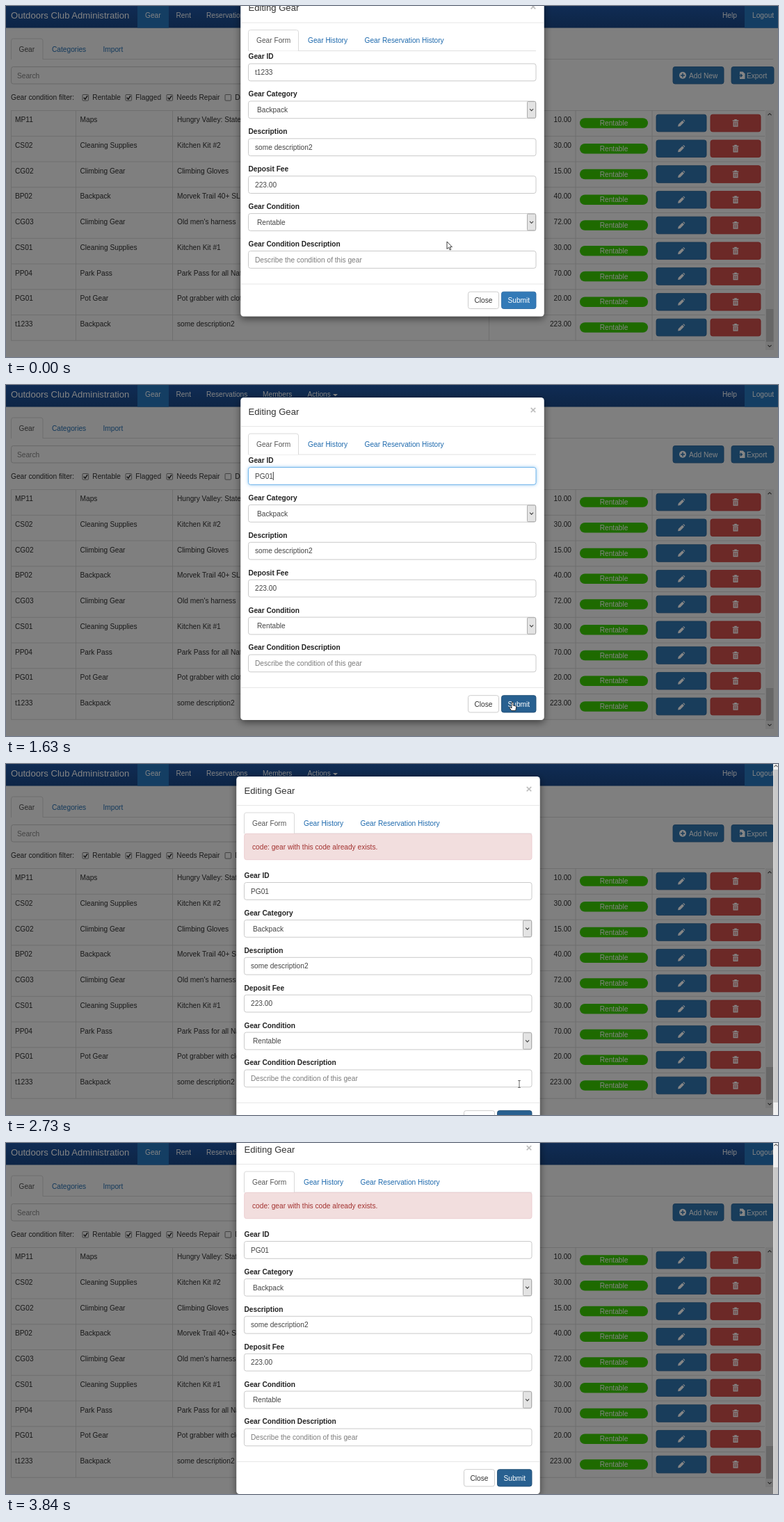
These frames come from a looping animation (1110 px wide and 505 px high, 4460 ms). An HTML page:

```html
<!DOCTYPE html>
<html lang="en">
<head>
<meta charset="utf-8">
<title>Gear administration</title>
<style>
html, body { margin: 0; width: 100%; height: 100%; overflow: hidden; background: #7f7f7f; }
svg { display: block; font-family: "Liberation Sans", Arial, sans-serif; }
text { white-space: pre; }
</style>
</head>
<body>
<svg width="1110" height="505" viewBox="0 0 1110 505">
  <defs>
    <linearGradient id="nav" x2="0" y2="1">
      <stop stop-color="#102c54"/><stop offset="1" stop-color="#0d2546"/>
    </linearGradient>
    <filter id="shadow" x="-10%" y="-10%" width="120%" height="120%">
      <feDropShadow dx="0" dy="3.6" stdDeviation="5.4" flood-opacity=".5"/>
    </filter>
    <filter id="glow" x="-5%" y="-50%" width="110%" height="200%">
      <feDropShadow dx="0" dy="0" stdDeviation="2.4" flood-color="#66afe9" flood-opacity=".7"/>
    </filter>
  </defs>
  <g id="page"></g>
  <g id="dialog"></g>
  <g id="pointer"></g>
</svg>
<script>
const LOOP = 4460, BODY = 10.18, HEADING = 13.1;
const layer = id => document.getElementById(id);

// y is the vertical middle of the capitals
const text = (x, y, str, fill = '#222', { size = BODY, anchor = 'start', weight = 'normal' } = {}) =>
  `<text x="${x}" y="${y + size * 0.36}" font-size="${size}" fill="${fill}" text-anchor="${anchor}" font-weight="${weight}">${str}</text>`;
const rect = (x, y, w, h, fill, stroke = 'none', r = 0, extra = '') =>
  `<rect x="${x}" y="${y}" width="${w}" height="${h}" rx="${r}" fill="${fill}" stroke="${stroke}" stroke-width=".9" ${extra}/>`;
const path = (d, fill, stroke = 'none', width = 1) =>
  `<path d="${d}" fill="${fill}" stroke="${stroke}" stroke-width="${width}"/>`;
const line = (d, stroke, width = 0.9) => path(d, 'none', stroke, width);
const at = (x, y, content) => `<g transform="translate(${x} ${y})">${content}</g>`;
const chevron = (x, y, dir, color) => line(`M${x - 2.5} ${y - 1.2 * dir}l2.5 ${2.5 * dir}l2.5 ${-2.5 * dir}`, color, 1.1);
const tab = (x, y, w, fill, stroke) =>
  path(`M${x} ${y + 30}V${y + 3}q0 -3 3 -3H${x + w - 3}q3 0 3 3V${y + 30}`, fill, stroke, 0.9);

// Page colours as seen through the half-black backdrop
const GREY = '#7f7f7f', RULE = '#6e6e6e', INK = '#191919', LINK = '#143a5c', ACTIVE = '#143e63',
  BLUE = '#193d5b', BLUE_EDGE = '#173652', RED = '#6c2927', RED_EDGE = '#6a1f1d', GREEN = '#1e6a00', PALE = '#858585';

const pencil = path('M-5 5L-4.2 1.8L1.4 -3.8L4 -1.2L-1.6 4.4Z M2.2 -4.5L3.2 -5.3L5.3 -3.2L4.7 -2Z', PALE);
const trash = path('M-4.3 -4.2H-1.8V-5.4H1.8V-4.2H4.3V-2.8H-4.3Z M-3.5 -2H3.5V5.3H-3.5Z', PALE) +
  line('M-1.7 -1V4M0 -1V4M1.7 -1V4', RED, 0.7);

const rows = [
  ['MP11', 'Maps', 'Hungry Valley: State Park', '10.00'],
  ['CS02', 'Cleaning Supplies', 'Kitchen Kit #2', '30.00'],
  ['CG02', 'Climbing Gear', 'Climbing Gloves', '15.00'],
  ['BP02', 'Backpack', 'Morvek Trail 40+ SL', '40.00'],
  ['CG03', 'Climbing Gear', 'Old men\'s harness', '72.00'],
  ['CS01', 'Cleaning Supplies', 'Kitchen Kit #1', '30.00'],
  ['PP04', 'Park Pass', 'Park Pass for all National Parks', '70.00'],
  ['PG01', 'Pot Gear', 'Pot grabber with cloth', '20.00'],
  ['t1233', 'Backpack', 'some description2', '223.00']
];

function drawNav() {
  const items = [[200, 'Gear'], [244.5, 'Rent'], [288, 'Reservations'], [369, 'Members'],
    [433.5, 'Actions'], [1030, 'Help'], [1073, 'Logout']];
  return rect(0, 0, 1110, 31.5, 'url(#nav)') +
    rect(189, 0, 45, 31.5, ACTIVE) + rect(1062, 0, 48, 31.5, ACTIVE) +
    text(7, 13.7, 'Outdoors Club Administration', PALE, { size: HEADING }) +
    items.map(([x, label]) => text(x, 13.7, label, PALE)).join('') +
    path('M470 13h7l-3.5 3.2Z', PALE);
}

function drawToolbar() {
  const checks = [[110, 'Rentable', 1], [172, 'Flagged', 1], [231, 'Needs Repair', 1], [315, 'Deleted', 0]];
  return line('M7 76.5H1103', RULE) + tab(7.5, 47, 45.5, GREY, RULE) +
    text(18.5, 62, 'Gear', '#2a2a2a') + text(66, 62, 'Categories', LINK) + text(139.5, 62, 'Import', LINK) +
    rect(7.5, 87.5, 692, 24.5, GREY, '#666', 3) + text(16, 100, 'Search', '#444') +
    rect(959, 87.5, 73, 24.5, BLUE, BLUE_EDGE, 3) + text(982, 100, 'Add New', PALE) +
    `<circle cx="973" cy="99.7" r="5" fill="${PALE}"/>` + line('M970 99.7h6M973 96.7v6', BLUE, 1.6) +
    rect(1043, 87.5, 61, 24.5, BLUE, BLUE_EDGE, 3) + text(1065, 100, 'Export', PALE) +
    path('M1055 94.5h4.5l3 3v7.5h-7.5Z', PALE) + line('M1052 100h6M1056 97.7l2.4 2.3l-2.4 2.3', BLUE, 1.3) +
    text(7, 131.5, 'Gear condition filter:', INK) +
    checks.map(([x, label, on]) => rect(x, 127.5, 8.6, 8.6, GREY, '#3a3a3a', 1) +
      (on ? line(`M${x + 1.8} 131.8l2 2.3l3.3 -4.9`, '#111', 1.4) : '') +
      text(x + 14.3, 131.5, label, INK)).join('');
}

function drawRow([id, category, description, fee], i) {
  const y = 150.5 + i * 36.75, mid = y + 18;
  return line(`M7 ${y + 36.75}H1091`, RULE) +
    text(13, y + 13, id, INK) + text(106.5, y + 13, category, INK) + text(246, y + 13, description, INK) +
    text(813, y + 13, fee, INK, { anchor: 'end' }) +
    rect(825, mid - 7.3, 98, 14.6, GREEN, 'none', 7.3) +
    text(874, mid, 'Rentable', PALE, { anchor: 'middle' }) +
    rect(935, mid - 12.3, 72, 24.6, BLUE, BLUE_EDGE, 3) + at(971, mid, pencil) +
    rect(1013, mid - 12.3, 72, 24.6, RED, RED_EDGE, 3) + at(1049, mid, trash);
}

function drawPage() {
  const columns = [7.5, 100.5, 239.5, 694.5, 819, 929].map(x => `M${x} 150.5V481`).join('');
  return rect(0, 0, 1110, 505, GREY) + drawNav() + drawToolbar() +
    line('M7 150.5H1091' + columns, RULE) + rows.map(drawRow).join('') +
    rect(1092, 150, 12, 345, '#787878') + rect(1093, 436, 10.5, 47, '#676767') +
    chevron(1098, 156, -1, '#222') + chevron(1098, 489, 1, '#222');
}

function drawField(label, value, i, s) {
  const y = 118.5 + i * 53.9, mid = y + 12.5;
  const isSelect = i === 1 || i === 4, isEmpty = i === 5, focused = i === 0 && s.focus;
  let out = text(348.5, y - 10.2, label, '#222', { weight: 'bold' }) +
    rect(348.5, y, 413.5, 24.8, '#fff', focused ? '#66afe9' : '#c4c4c4', 3, focused ? 'filter="url(#glow)"' : '');
  if (focused && s.selected) {
    const [from, to] = s.selected;
    out += rect(from, mid - 6.2, to - from, 12.4, '#3390ff');
  }
  out += text(isSelect ? 361 : 358, mid, value, isEmpty ? '#7c7c7c' : focused && s.selected ? '#fff' : '#444');
  if (focused && s.caret) out += rect(s.caret, mid - 6, 0.9, 12, '#222');
  if (isSelect) out += rect(749.5, y + 0.6, 12, 23.6, '#e3e3e3', '#a5a5a5', 1) + chevron(755.6, mid, 1, '#444');
  return out;
}

function drawDialog(s) {
  const shift = s.error ? 52 : 0, link = '#1d69ad';
  const fields = [['Gear ID', s.id], ['Gear Category', 'Backpack'], ['Description', 'some description2'],
    ['Deposit Fee', '223.00'], ['Gear Condition', 'Rentable'],
    ['Gear Condition Description', 'Describe the condition of this gear']];
  const head = rect(337.3, 18, 436.4, 464 + shift, '#fff', 'none', 4.4, 'filter="url(#shadow)"') +
    text(348.5, 38, 'Editing Gear', '#333', { size: HEADING }) +
    text(758, 35.5, '×', '#bdbdbd', { size: 15.3, weight: 'bold', anchor: 'middle' }) +
    line('M338 59.5H773', '#e5e5e5') + line('M348.5 100H762', '#ddd') + tab(348.5, 70, 72, '#fff', '#d5d5d5') +
    text(360, 85, 'Gear Form', '#555') + text(434, 85, 'Gear History', link) +
    text(515.5, 85, 'Gear Reservation History', link);
  const alert = s.error ? rect(348.7, 100.3, 413.3, 37.4, '#f2dede', '#ebccd1', 3) +
    text(360, 119, 'code: gear with this code already exists.', '#a33331') : '';
  const footer = line('M338 435.5H773', '#e5e5e5') +
    rect(664.5, 446.7, 44, 24.3, '#fff', '#c8c8c8', 3) + text(686.4, 459, 'Close', '#333', { anchor: 'middle' }) +
    rect(712.5, 446.7, 49.5, 24.3, s.hover ? '#286090' : '#337ab7', s.hover ? '#204d74' : '#2e6da4', 3) +
    text(737.3, 459, 'Submit', '#fff', { anchor: 'middle' });
  const body = fields.map(([label, value], i) => drawField(label, value, i, s)).join('') + footer;
  const scrollbar = s.error ? rect(1103, 0, 7, 505, '#f1f1f1') +
    rect(1103.5, 8 - s.dy * 0.93, 6.5, 479, '#c9c9c9') + chevron(1107, 3, -1, '#555') : '';
  return at(s.error ? -6 : 0, s.dy, head + alert + at(0, shift, body)) + scrollbar;
}

const pointers = {
  arrow: path('M0 0V10.6L2.5 8.3L4.2 12L5.8 11.3L4.2 7.7H7.4Z', '#fff', '#111', 0.8),
  beam: line('M-1.8 -5H1.8M0 -5V5M-1.8 5H1.8', '#444', 0.8),
  hand: path('M-1 0.8Q0 -0.8 1 0.8V5L5 6Q6 6.4 5.6 8L4.7 12.5H-1.2L-4 8.5Q-4.2 6.8 -2.6 7.4L-1 9Z', '#fff', '#111', 0.8)
};

// Each step changes only the listed properties
const steps = [
  [0, { dy: -35.5, id: 't1233', pointer: ['arrow', 634, 339] }],
  [120, { dy: -2, pointer: ['arrow', 470, 240] }],
  [290, { dy: 0, pointer: ['arrow', 347, 155] }],
  [430, { focus: true, caret: 384, pointer: ['beam', 385, 131] }],
  [550, { caret: 0, selected: [369, 384], pointer: ['beam', 369, 131] }],
  [670, { selected: [358, 384], pointer: ['beam', 350, 131] }],
  [790, { pointer: ['arrow', 290, 127] }],
  [1150, { id: 'P', selected: null, caret: 365 }],
  [1270, { id: 'PG', caret: 372.7 }],
  [1390, { id: 'PG01', caret: 383.8 }],
  [1510, { pointer: ['arrow', 713, 443] }],
  [1630, { pointer: ['hand', 728, 456], hover: true }],
  [1750, { pointer: ['hand', 737.5, 460] }],
  [1870, { caret: 0 }],
  [2240, { caret: 383.8 }],
  [2490, { focus: false }],
  [2610, { error: true }],
  [2730, { pointer: ['beam', 738, 460.5] }],
  [3480, { dy: -2 }],
  [3600, { dy: -11 }],
  [3720, { dy: -23 }],
  [3840, { dy: -29, pointer: null }]
];

let shown = -1;
function render(now) {
  const t = now % LOOP;
  const count = steps.filter(([time]) => time <= t).length;
  if (count !== shown) {
    shown = count;
    const state = Object.assign({}, ...steps.slice(0, count).map(([, change]) => change));
    layer('dialog').innerHTML = drawDialog(state);
    const [kind, x, y] = state.pointer || [];
    layer('pointer').innerHTML = kind ? at(x, y, pointers[kind]) : '';
  }
}

layer('page').innerHTML = drawPage();
const start = performance.now();
function tick() {
  render(performance.now() - start);
  requestAnimationFrame(tick);
}
tick();
</script>
</body>
</html>
```
